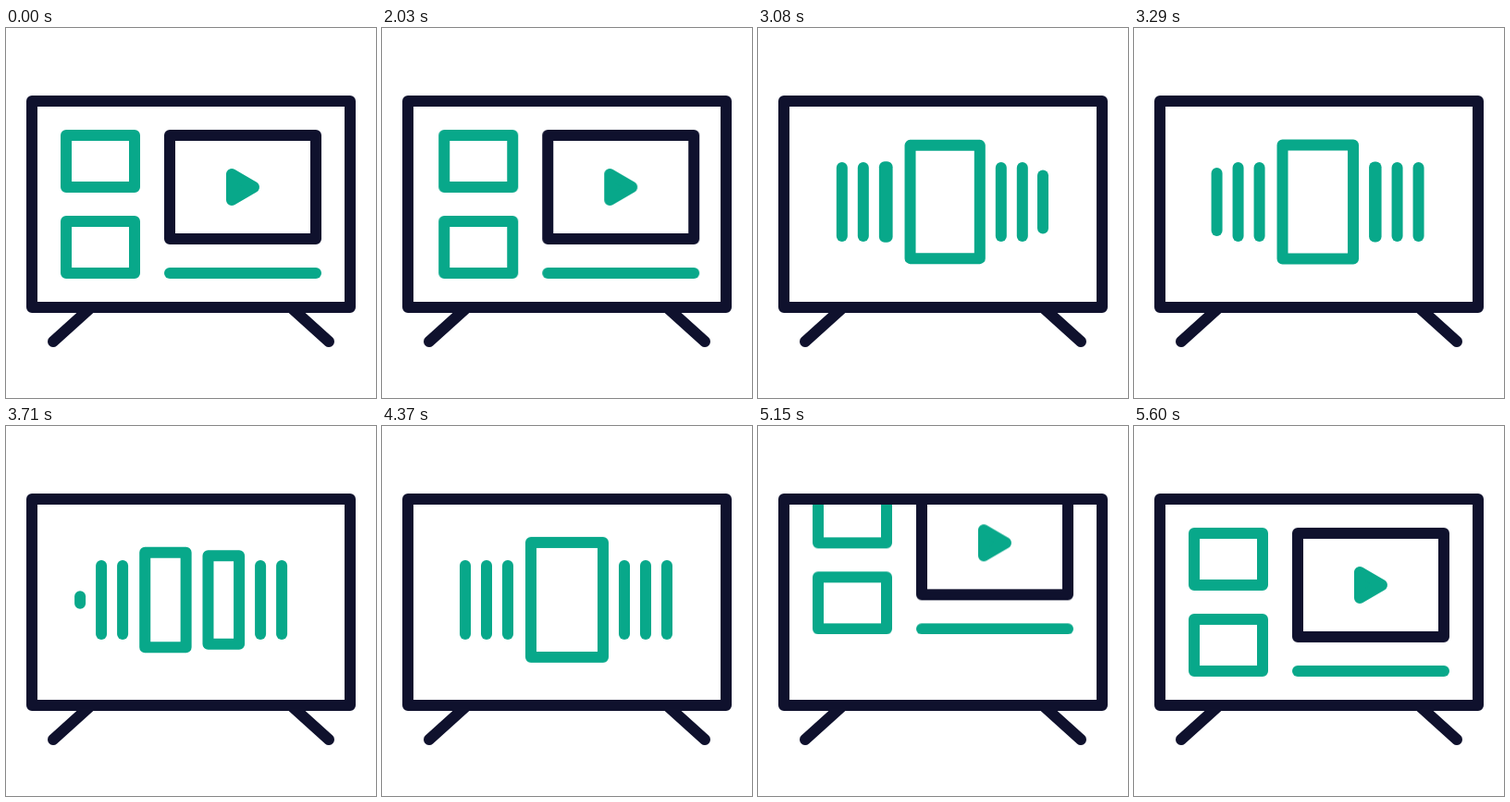
Recreate the animation shown at these times as an HTML page without scripts. Size 400x400 px, loop 5630 ms.

```html
<!DOCTYPE html>
<html lang="en">
<head>
<meta charset="utf-8">
<title>TV interface</title>
<style>
  html, body { margin: 0; width: 100%; height: 100%; overflow: hidden; background: #fff; }
  svg { display: block; }
  .stage {
    --dark: #0f112d; --green: #08a88a; --loop: 5630ms;
    width: 100%; height: 100%;
    fill: none; stroke: var(--dark); stroke-width: 12;
    stroke-linecap: round; stroke-linejoin: round;
  }
  .green { stroke: var(--green); }
  .play { fill: var(--green); }

  .home { animation: home var(--loop) infinite; }
  .carousel { animation: show var(--loop) step-end infinite, lift var(--loop) linear infinite; }

  /* Each slot moves to the next one per step: lower case = start, upper case = end */
  .slot {
    --w: .01px; --h: 74px; --W: .01px; --H: 74px; --X: calc(var(--x) + 23px);
    animation: step var(--loop) cubic-bezier(.33, 0, .67, 1) infinite;
  }
  .opening { --X: 161px; --W: 78px; --H: 124px; }
  .closing { --w: 78px; --h: 124px; --X: 262px; }
  .sprout { animation: step var(--loop) cubic-bezier(.33, 0, .67, 1) infinite, sprout var(--loop) linear infinite; }
  .wilt { x: var(--x); width: .01px; animation: wilt var(--loop) linear infinite; }

  @keyframes home {
    0%, 35.58% { transform: translate(0, 0); animation-timing-function: cubic-bezier(.33, 0, .67, 1); }
    46.06% { transform: translate(335px, 0); }
    46.07%, 88.8% { transform: translate(0, -195px); animation-timing-function: cubic-bezier(.1, .7, .2, 1); }
    100% { transform: translate(0, 0); }
  }
  @keyframes show {
    0%, 90% { opacity: 0; }
    40.3% { opacity: 1; }
    100% { opacity: 0; }
  }
  @keyframes lift {
    0%, 76.38% { transform: translateY(0); animation-timing-function: cubic-bezier(.8, 0, .95, .3); }
    87.21% { transform: translateY(-44px); }
    89.34%, 100% { transform: translateY(-176px); }
  }
  @keyframes step {
    0%, 40.3% {
      x: var(--x); width: var(--w); y: 188px; height: .01px;
      animation-timing-function: ease-out;
    }
    44.99%, 49.62%, 54.21%, 58.84%, 63.39%, 68.02%, 100% {
      x: var(--x); width: var(--w); y: calc(188px - var(--h) / 2); height: var(--h);
    }
    49.61%, 58.83%, 68.01% {
      x: var(--X); width: var(--W); y: calc(188px - var(--H) / 2); height: var(--H);
    }
  }
  @keyframes sprout {
    0%, 47.24%, 49.62%, 56.47%, 58.84%, 65.67%, 68.02%, 100% { opacity: 0; y: 188px; height: .01px; }
    47.25%, 56.48%, 65.68% { opacity: 1; y: 188px; height: .01px; }
    49.61%, 58.83%, 68.01% { opacity: 1; y: 151px; height: 74px; }
  }
  @keyframes wilt {
    0%, 40.3% { opacity: 1; y: 188px; height: .01px; animation-timing-function: ease-out; }
    44.99%, 49.62%, 54.21%, 58.84%, 63.39%, 68.02%, 100% { opacity: 1; y: 151px; height: 74px; }
    47.25%, 56.48%, 65.68% { opacity: 1; y: 188px; height: .01px; }
    47.26%, 49.61%, 56.49%, 58.83%, 65.69%, 68.01% { opacity: 0; y: 188px; height: .01px; }
  }
</style>
</head>
<body>
<svg class="stage" viewBox="0 0 400 400">
  <svg x="34" y="85" width="332" height="211" viewBox="34 85 332 211">
    <g class="carousel green">
      <rect class="slot sprout" style="--x: 67px"/>
      <rect class="slot" style="--x: 90px"/>
      <rect class="slot" style="--x: 113px"/>
      <rect class="slot opening" style="--x: 136px"/>
      <rect class="slot closing" style="--x: 161px"/>
      <rect class="slot" style="--x: 262px"/>
      <rect class="slot" style="--x: 285px"/>
      <rect class="wilt" style="--x: 308px"/>
    </g>
    <g class="home">
      <rect x="177" y="116" width="158" height="112"/>
      <g class="green">
        <rect x="65" y="116" width="74" height="56"/>
        <rect x="65" y="209" width="74" height="56"/>
        <path d="M177 265H335"/>
        <path class="play" d="M244 158V186L268 172Z"/>
      </g>
    </g>
  </svg>
  <path d="M92 302L51 339M308 302L349 339"/>
  <rect x="28" y="79" width="344" height="223"/>
</svg>
</body>
</html>
```
